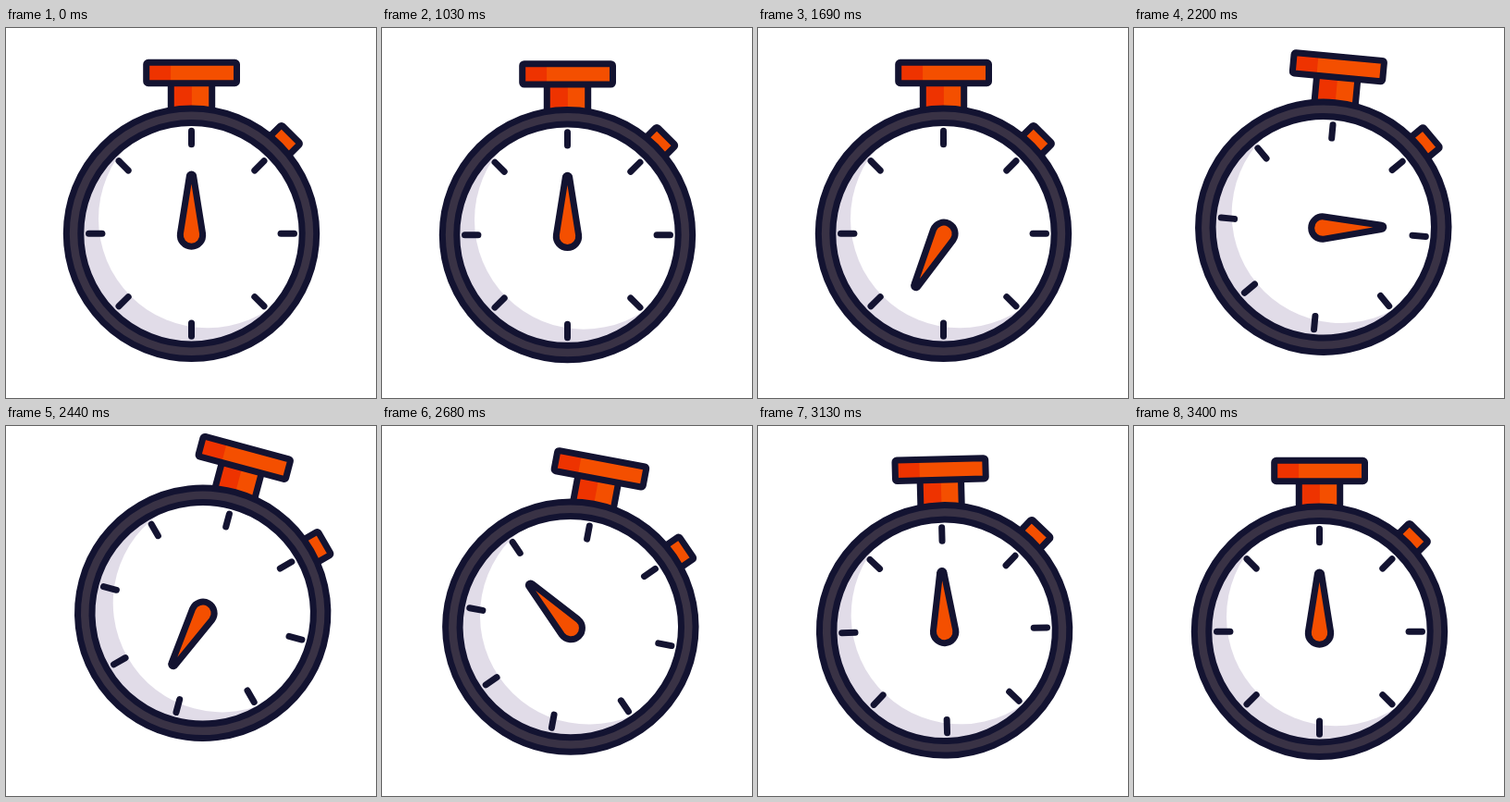
These frames come from a looping animation (400 px wide and 400 px high, 3.43 s). An HTML page:

```html
<!DOCTYPE html>
<html lang="en">
<head>
<meta charset="utf-8">
<title>Stopwatch</title>
<style>
  html, body { margin: 0; width: 100%; height: 100%; overflow: hidden; background: #fff; }
  svg { display: block; width: 100%; height: 100%; }
  .line { stroke: #131331; stroke-width: 7; stroke-linejoin: round; stroke-linecap: round; }
  .none { fill: none; }
  .orange { fill: #f44f00; }
  .red { fill: #ee3300; }
</style>
</head>
<body>
<svg viewBox="0 0 400 400">
  <defs><clipPath id="face"><circle r="118"/></clipPath></defs>
  <g id="watch">
    <rect id="button" class="line orange" x="-14.4" y="-152" width="28.8" height="30" rx="1.8"/>
    <rect class="orange" x="-22.2" y="-165" width="44.4" height="34"/>
    <rect class="red" x="-22.2" y="-165" width="22.6" height="34"/>
    <path class="line none" d="M-22.2-162V-132M22.2-162V-132"/>
    <rect class="orange" x="-48.8" y="-185" width="97.8" height="22.4" rx="2"/>
    <rect class="red" x="-48.8" y="-185" width="26.4" height="22.4" rx="2"/>
    <rect class="line none" x="-48.8" y="-185" width="97.8" height="22.4" rx="2"/>

    <circle r="118" fill="#e1dce8"/>
    <circle cx="17.5" cy="-16" r="118" fill="#fff" clip-path="url(#face)"/>
    <circle r="127.5" fill="none" stroke="#393245" stroke-width="12"/>
    <circle class="line none" r="135.2"/>
    <circle class="line none" r="119.7"/>
    <g id="ticks"></g>
    <path id="hand" class="line orange" d="M-2.2-63.4A2.2 2.2 0 0 1 2.2-63.4L12.1-1.2A12.2 12.2 0 1 1-12.1-1.2Z"/>
  </g>
</svg>
<script>
  const LOOP = 3430, START = 1030, STEP = 30;
  const { sin, cos, exp, PI, min, max, floor } = Math;
  const $ = id => document.getElementById(id);

  const ramp = (t, from, to) => min(1, max(0, (t - from) / (to - from)));
  const smooth = (t, from, to) => { const u = ramp(t, from, to); return u * u * (3 - 2 * u); };
  const settle = t => 1 - smooth(t, 3100, 3400);

  // Rises to 1, holds, then swings back to 0 like a damped spring
  function leap(t, release, rate, decay) {
    const s = t - release;
    return s < 0 ? smooth(t, 2080, 2380) : exp(-decay * s) * cos(rate * s) * settle(t);
  }

  // The press pushes the watch down, then it hops up once
  function bounce(t) {
    const u = smooth(t, 985, 1540);
    return (11.5 - 6 * u) * sin(2 * PI * u);
  }

  // Two turns at constant speed, then an overshoot that rings out
  function handAngle(t) {
    const from = 1240, speed = 0.4626, rate = 0.017;
    const s = t - from - 720 / speed;
    return s < 0
      ? max(0, t - from) * speed
      : 720 + speed / rate * exp(-0.008 * s) * sin(rate * s) * settle(t);
  }

  $('ticks').innerHTML = Array.from({ length: 8 }, (_, i) =>
    `<path class="line" d="M0-111V-96.6" transform="rotate(${i * 45})"/>`).join('');

  function draw(ms) {
    const t = ms < START ? 0 : START + floor((ms - START) / STEP) * STEP;
    const x = 12.2 * leap(t, 2575, 0.0108, 0.0042);
    const y = bounce(t) - 20 * leap(t, 2585, 0.0122, 0.0046);
    const tilt = 15 * leap(t, 2620, 0.0069, 0.0043);
    const press = 9 * sin(PI * ramp(t, 1000, 1270)) ** 2;

    $('watch').setAttribute('transform', `translate(${200.5 + x} ${222.3 + y}) rotate(${tilt})`);
    $('button').setAttribute('transform', `rotate(45) translate(0 ${press})`);
    $('hand').setAttribute('transform', `translate(0 .8) rotate(${handAngle(t)}) translate(0 .5)`);
  }

  const begin = performance.now();
  function tick() {
    draw((performance.now() - begin) % LOOP);
    requestAnimationFrame(tick);
  }
  tick();
</script>
</body>
</html>
```
